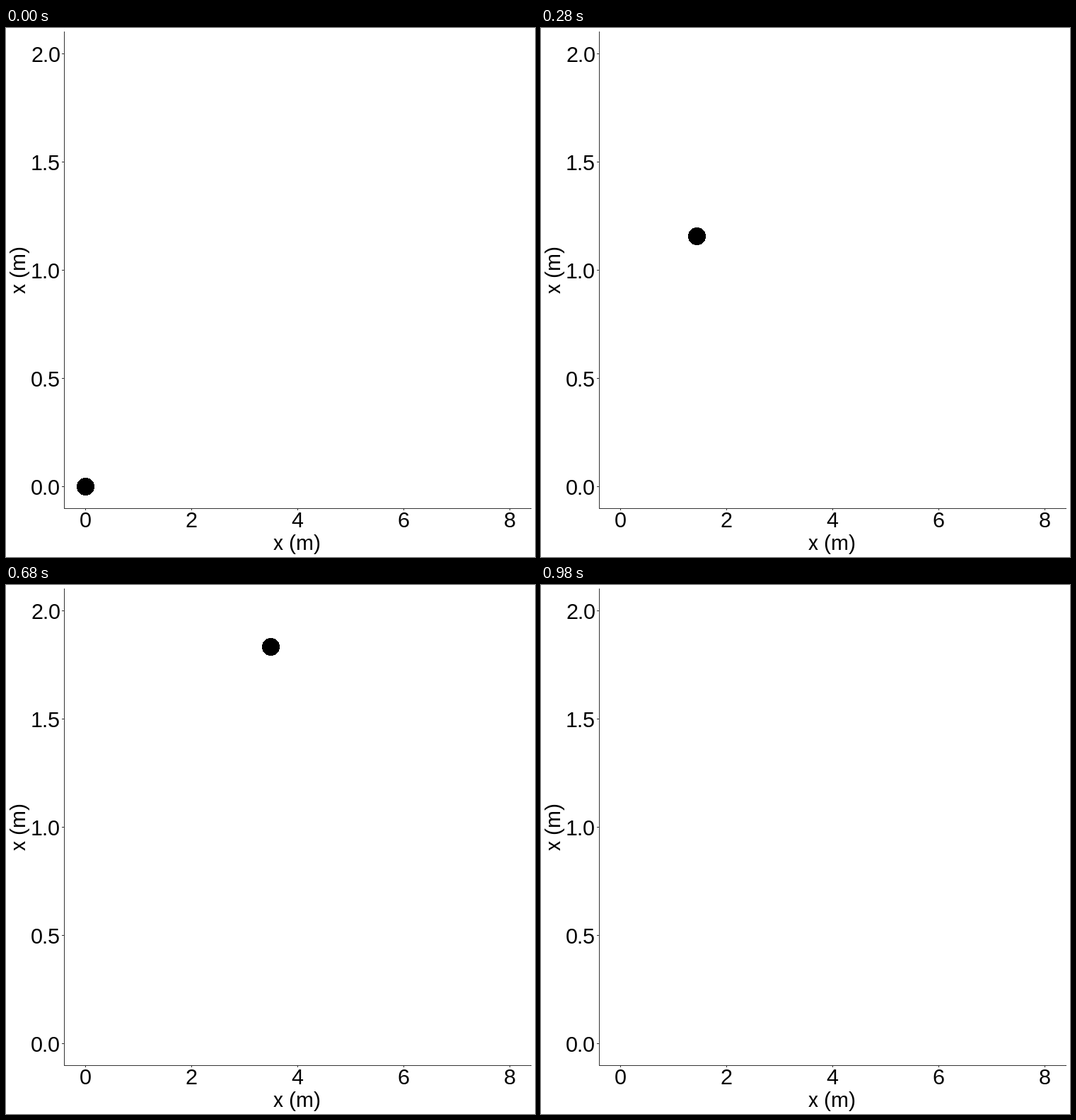
A matplotlib script that plays this animation: 748x748 px, repeating every 1 s.

```python
import math

import matplotlib.pyplot as plt
from matplotlib.animation import FuncAnimation
from matplotlib.patches import Circle, Rectangle

SIZE, DPI = 748, 100
PT = 72 / DPI                      # points per pixel
FRAMES, INTERVAL = 50, 20
LEFT, RIGHT, TOP, BOTTOM = 82, 743, 5, 679
X0, X_SCALE = 111.64, 75.1         # pixel of x = 0, pixels per metre
Y0, Y_SCALE = 648.0, 305.95
DT, SPEED, G = 0.01713, 6.0, 9.8
AXIS_COLOR = "#333333"

plt.rcParams.update({
    "font.family": "Liberation Sans",
    "text.hinting": "native",
    "text.hinting_factor": 1,
    "toolbar": "None",
})

fig = plt.figure(figsize=(SIZE / DPI, SIZE / DPI), dpi=DPI, facecolor="white")
ax = fig.add_axes([0, 0, 1, 1])
ax.set_xlim(0, SIZE)
ax.set_ylim(SIZE, 0)
ax.axis("off")


def to_pixel(x, y):
    """Whole pixel that holds a point given in metres."""
    return (math.floor(X0 + X_SCALE * x + 0.5),
            math.floor(Y0 - Y_SCALE * y + 0.5))


def bar(x, y, width, height):
    ax.add_patch(Rectangle((x, y), width, height, color=AXIS_COLOR, lw=0,
                           antialiased=False))


def label(x, y, text, ha="center", rotation=0):
    ax.text(x, y, text, size=30 * PT, ha=ha, va="baseline",
            rotation=rotation, rotation_mode="anchor")


def ball_center(frame):
    t = frame * DT
    px, py = to_pixel(SPEED * t, SPEED * t - G * t * t / 2)
    return px + 0.5, py + 0.5


bar(LEFT, TOP, 1, BOTTOM - TOP)
bar(LEFT, BOTTOM, RIGHT - LEFT, 1)

for k in range(5):
    px, py = to_pixel(2 * k, k / 2)
    bar(px, BOTTOM, 1, 3)
    bar(LEFT - 3, py, 3, 1)
    label(px, 706, str(2 * k))
    label(77, py + 12, f"{k / 2:.1f}", ha="right")

label(412, 738, "x (m)")
label(28, 341, "x (m)", rotation=90)

ball = Circle(ball_center(0), 12, color="black", lw=0, antialiased=False)
ax.add_patch(ball)


def update(frame):
    ball.center = ball_center(frame)
    ball.set_visible(frame < FRAMES - 1)   # the last frame is empty
    return (ball,)


anim = FuncAnimation(fig, update, frames=FRAMES, interval=INTERVAL,
                     repeat=True, repeat_delay=0)
plt.show()
```
